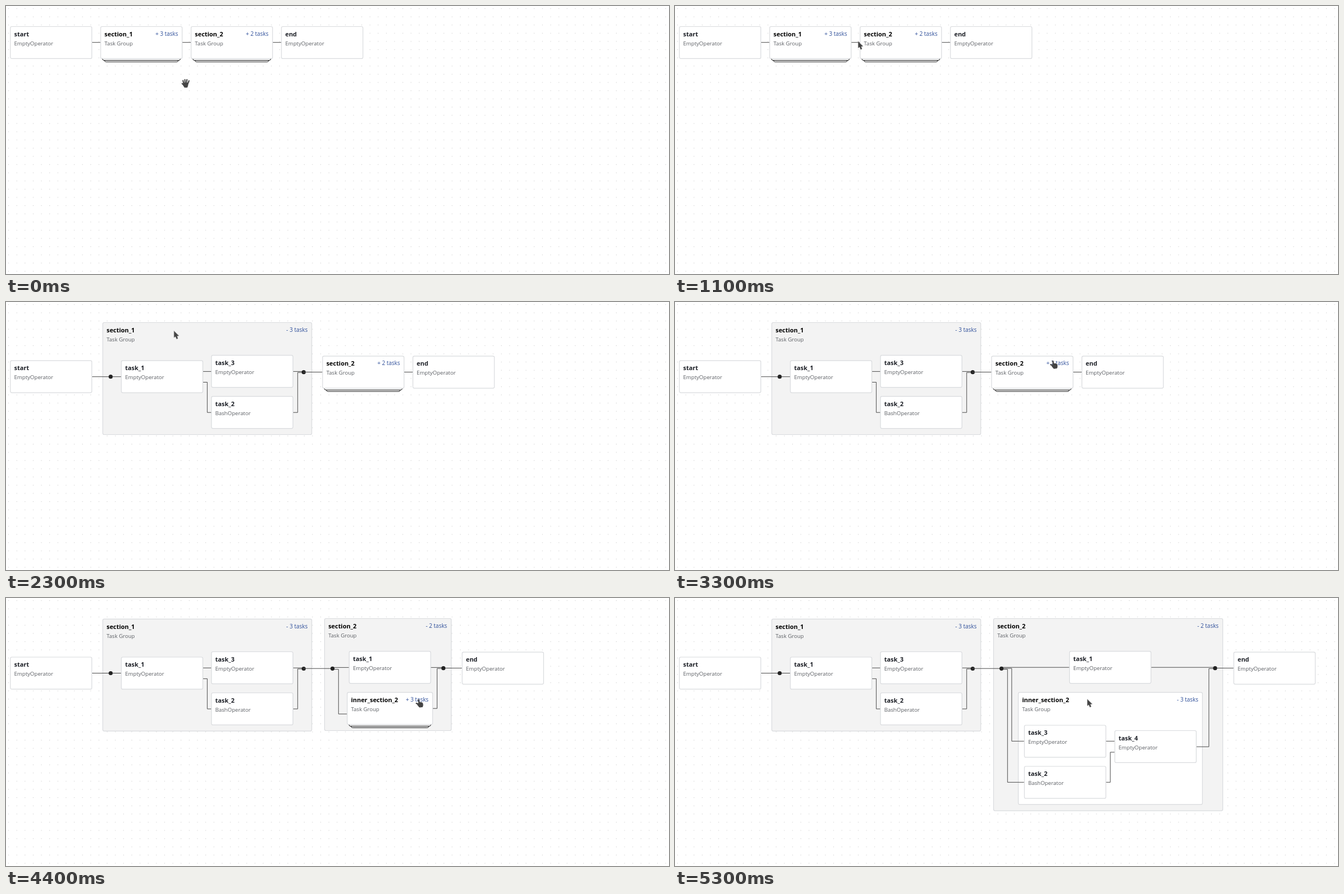
These frames come from a looping animation (1177x476 px, 5400 ms). An HTML page:

```html
<!DOCTYPE html>
<html lang="en">
<head>
<meta charset="utf-8">
<title>Task group graph</title>
<style>
  html, body { margin: 0; width: 100%; height: 100%; overflow: hidden; background: #fff; }
  svg { display: block; width: 100vw; height: 100vh; font-family: "Open Sans", "Noto Sans", sans-serif; }
  .box { fill: #fff; stroke: #d9dbde; stroke-width: 1.2; }
  .group { fill: #f3f3f3; }
  .title { font-size: 10.9px; font-weight: 700; fill: #1c1f26; }
  .strong { fill: #000; }
  .kind { font-size: 9.6px; fill: #5c5f64; }
  .toggle { font-size: 9.95px; fill: #2f4f9a; text-anchor: end; }
  .stack { fill: none; stroke: #111; stroke-width: 1; }
  .edge { fill: none; stroke: #4a4a4a; stroke-width: 1; }
  .dot { fill: #222; }
</style>
</head>
<body>
<svg viewBox="0 0 1177 476">
  <defs>
    <pattern id="grid" x="-2.7" y="-2.7" width="14.58" height="14.58" patternUnits="userSpaceOnUse">
      <circle cx="7.3" cy="7.3" r=".62" fill="#cbcbcb"/>
    </pattern>
  </defs>
  <rect width="1177" height="476" fill="url(#grid)"/>
  <g id="scenes" transform="translate(-.2 -.3)"></g>
  <g id="cursor" stroke-linejoin="round" stroke-linecap="round">
    <g data-kind="grab" fill="#444" stroke="#444">
      <path d="M-3.2 0L-4.3-4.6M-.6-1L-.9-6.3M2-1L2.7-6.2M4.4 1L6.3-4.2M-2.5 4L-5.8 .8" stroke-width="2.1" fill="none"/>
      <path d="M-3.6-.6L4.8-.6L4.4 4L3.2 7.6H-1.6L-4 3.4Z" stroke-width=".8"/>
    </g>
    <path data-kind="arrow" d="M0 0V11.4L2.6 9.5L4.6 14L6.8 13L5.2 8.8L8.4 8.2Z" fill="#444" stroke="#777" stroke-width=".5"/>
    <g data-kind="point" fill="#444" stroke="#444">
      <path d="M.2 1.2L1.6 7M-3.4 7.2L0 9" stroke-width="2.4" fill="none"/>
      <path d="M1 5.4L5.6 5.6L7.6 6.8L8.2 10.4L7.4 13.6L2 14.2L-1.2 10.4Z" stroke-width="1"/>
    </g>
  </g>
</svg>
<script>
const NODE_W = 144.6, NODE_H = 56.9;

const text = (cls, x, y, s) => `<text class="${cls}" x="${x}" y="${y}">${s}</text>`;
const edge = d => `<path class="edge" d="${d}"/>`;
const dot = (x, y) => `<circle class="dot" cx="${x}" cy="${y}" r="3.6"/>`;
const box = (x, y, w, h, cls = '') =>
  `<rect class="box ${cls}" x="${x}" y="${y}" width="${w}" height="${h}" rx="2.5"/>`;
const labels = (x, y, name, kind, cls = '') =>
  text('title ' + cls, x + 6.7, y + 17.2, name) + text('kind', x + 6.7, y + 33.3, kind);

const task = (x, y, name, kind = 'EmptyOperator') => box(x, y, NODE_W, NODE_H) + labels(x, y, name, kind);

function closedGroup(x, y, name, count, w = NODE_W) {
  const r = x + w, b = y + NODE_H;
  const ledge = (inset, top, bottom) => `M${x + inset} ${b + top}Q${x + inset + .5} ${b + bottom} ${x + inset + 3} ${b + bottom}`
    + `H${r - inset - 3}Q${r - inset - .5} ${b + bottom} ${r - inset} ${b + top}`;
  return `<path class="stack" d="${ledge(3, .5, 3.1)}${ledge(6.5, 3.1, 5.8)}"/>` + box(x, y, w, NODE_H)
    + labels(x, y, name, 'Task Group', 'strong') + text('toggle', r - 7.2, y + 16.2, `+ ${count} tasks`);
}

const openGroup = (x, y, w, h, name, count, cls = 'group') => box(x, y, w, h, cls)
  + labels(x, y, name, 'Task Group', 'strong') + text('toggle', x + w - 7.4, y + 16.2, `- ${count} tasks`);

// The start task and the expanded first section
const expandedStart = dy => `<g transform="translate(0 ${dy})">`
  + openGroup(172, 36.8, 371, 199, 'section_1', 3)
  + edge('M152.6 133H205M349.6 123.7H365M349.6 142.8H357.5V196.5H365M509.6 123.7H528M509.6 196.5H518V125.5H528')
  + task(8, 104.5, 'start') + task(205, 104.5, 'task_1')
  + task(365, 95, 'task_3') + task(365, 168, 'task_2', 'BashOperator')
  + dot(186, 133) + dot(528.7, 125) + '</g>';

const collapsed = edge('M152.6 65H168M313 65H329M473.4 65H489')
  + task(8, 36.8, 'start') + closedGroup(168.3, 36.8, 'section_1', 3)
  + closedGroup(328.8, 36.8, 'section_2', 2) + task(489.2, 36.8, 'end');

const firstOpen = expandedStart(0) + edge('M528 124.8H562M707 124.8H723')
  + closedGroup(562.2, 96.5, 'section_2', 2) + task(722.6, 96.5, 'end');

const secondOpen = expandedStart(.8) + openGroup(565.7, 36.8, 225, 199, 'section_2', 2)
  + edge('M528 125.5H580M580 123.7H609M580 127H590.5V206.3H606M754 123.7H777M757 196.5H765.5V125.5H777M777 124.8H810')
  + task(609.5, 95, 'task_1') + closedGroup(606, 168, 'inner_section_2', 3, 151.5)
  + task(810, 96.5, 'end') + dot(579.8, 125.6) + dot(776.7, 125);

const innerOpen = expandedStart(.8) + openGroup(565.7, 36.8, 407, 341.3, 'section_2', 2)
  + openGroup(609.7, 168, 326.8, 199, 'inner_section_2', 3, '')
  + edge('M528 125.5H580M580 123.5H700M580 125.3H598V254.6H620M580 127H590.5V327.6H620M845 123.5H959'
    + 'M765 254.6H781M765 327.6H773V274.2H781M925.6 264.5H948V125.7H959M959 124.8H992')
  + task(700.6, 95, 'task_1') + task(620.5, 226.3, 'task_3')
  + task(620.5, 299.3, 'task_2', 'BashOperator') + task(781, 235.8, 'task_4')
  + task(992.2, 96.5, 'end') + dot(579.8, 125.6) + dot(959, 125);

const scenes = [[0, collapsed], [2300, firstOpen], [3400, secondOpen], [4500, innerOpen]];
const root = document.getElementById('scenes');
root.innerHTML = scenes.map(([, markup]) => `<g>${markup}</g>`).join('');

// time, x, y, and the cursor kind used from then on
const stops = [
  [0, 318.5, 137, 'grab'], [500, 319, 137.5, 'grab'], [1000, 325, 70, 'grab'],
  [1100, 325.2, 63.2, 'arrow'], [1300, 321, 61, 'arrow'], [1600, 307, 53, 'arrow'],
  [1700, 306.3, 51.7, 'arrow'], [1900, 299, 52, 'point'], [2300, 298.3, 51.7, 'arrow'],
  [2600, 298.3, 51.7, 'arrow'], [2900, 543, 86, 'grab'], [3000, 590, 93, 'arrow'],
  [3200, 670.5, 104, 'point'], [3400, 670.5, 104, 'arrow'], [3600, 671, 106, 'arrow'],
  [4000, 722, 169, 'arrow'], [4200, 732, 179.5, 'point'], [4500, 732, 180, 'arrow'],
  [5400, 732, 180, 'arrow']
];
const cursor = document.getElementById('cursor');
const show = (el, on) => el.setAttribute('visibility', on ? 'visible' : 'hidden');

function draw(now) {
  const t = Math.floor(now % 5400 / 100) * 100;
  const scene = scenes.findLastIndex(([start]) => t >= start);
  [...root.children].forEach((el, i) => show(el, i === scene));

  const i = stops.findLastIndex(([start]) => t >= start);
  const [t0, x0, y0, kind] = stops[i], [t1, x1, y1] = stops[i + 1];
  const k = (t - t0) / (t1 - t0);
  cursor.setAttribute('transform', `translate(${x0 + (x1 - x0) * k} ${y0 + (y1 - y0) * k})`);
  for (const el of cursor.children) show(el, el.dataset.kind === kind);
  requestAnimationFrame(draw);
}
requestAnimationFrame(draw);
</script>
</body>
</html>
```
